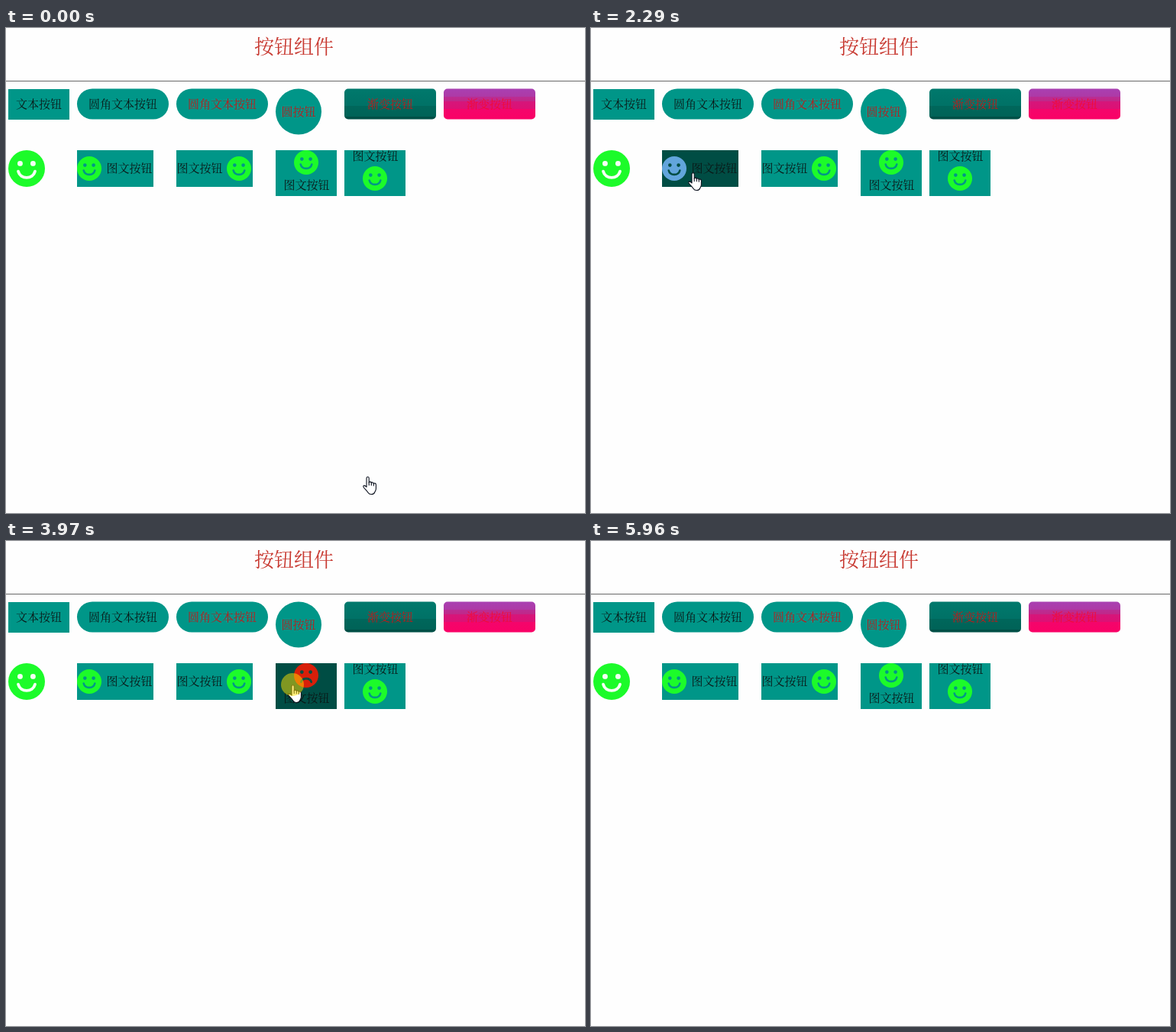
Animation of 758x635 px, one loop 6.27 s. Source, as an HTML page:

```html
<!DOCTYPE html>
<html lang="zh-CN">
<head>
<meta charset="utf-8">
<title>按钮组件</title>
<style>
  html, body { margin: 0; width: 100%; height: 100%; overflow: hidden; background: #fefefe; }
  svg { display: block; width: 758px; height: 635px; }
  text { font: 15px "Noto Serif CJK SC", "Noto Sans CJK SC", "Noto Sans CJK", serif; fill: #0b1716; }
  .title { font-size: 26px; fill: #c83a32; }
  .red { fill: #c21a1a; }
  .hot { fill: #f30a35; }
  .teal { fill: #009688; }
  .widget { --bg: #009688; --face: #1cfb2a; --hole: var(--bg); }
  .widget.hover { --bg: #004d44; --face: #62a5dc; }
  .widget.pressed { --face: #d81f0a; }
  .widget.bare { --hole: #f6fff6; }
  .panel { fill: var(--bg); }
  .face { fill: var(--face); }
  .eye { fill: var(--hole); }
  .mouth { fill: none; stroke: var(--hole); stroke-width: 2.6; stroke-linecap: round; }
  .sad, .pressed .smile { display: none; }
  .pressed .sad { display: inline; }
  #hand path { fill: #fff; stroke: #0a0f1c; stroke-width: 1.1; stroke-linejoin: round; stroke-linecap: round; }
</style>
</head>
<body>
<svg viewBox="0 0 758 635">
  <defs>
    <linearGradient id="forest" x2="0" y2="1">
      <stop offset="0" stop-color="#00796c"/><stop offset=".55" stop-color="#007166"/>
      <stop offset=".55" stop-color="#00675b"/><stop offset=".92" stop-color="#006257"/>
      <stop offset=".92" stop-color="#004f46"/>
    </linearGradient>
    <linearGradient id="berry" x2="0" y2="1">
      <stop offset="0" stop-color="#a940b2"/><stop offset=".27" stop-color="#ae39a5"/>
      <stop offset=".27" stop-color="#ba2d93"/><stop offset=".4" stop-color="#c02889"/>
      <stop offset=".4" stop-color="#d5167b"/><stop offset=".67" stop-color="#dd1074"/>
      <stop offset=".67" stop-color="#f4056b"/><stop offset="1" stop-color="#fa0166"/>
    </linearGradient>
  </defs>
  <text class="title" x="325" y="33.5">按钮组件</text>
  <path d="M0 69.5H758" stroke="#686868"/>

  <rect class="teal" x="3" y="80" width="80" height="40"/>
  <text x="13" y="105">文本按钮</text>
  <rect class="teal" x="93" y="79.5" width="120" height="40" rx="20"/>
  <text x="108" y="105">圆角文本按钮</text>
  <rect class="teal" x="223" y="79.5" width="120" height="40" rx="20"/>
  <text class="red" x="238" y="105">圆角文本按钮</text>
  <circle class="teal" cx="383" cy="109.5" r="30"/>
  <text class="red" x="360.5" y="115">圆按钮</text>
  <rect fill="url(#forest)" x="443" y="79.5" width="120" height="40" rx="5"/>
  <text class="red" x="473" y="105">渐变按钮</text>
  <rect fill="url(#berry)" x="573" y="79.5" width="120" height="40" rx="5"/>
  <text class="hot" x="603" y="105">渐变按钮</text>

  <g id="widgets"></g>
  <g id="hand">
    <path d="M5 14V2.4C5 .1 8.2 .1 8.2 2.4V8.2C8.6 6.6 11.2 6.8 11.3 8.6C11.8 7.4 14.2 7.8 14.3 9.6C14.9 8.5 17.3 9 17.4 11V16C17.4 18.6 16.1 19.6 15.6 21C14.6 24.2 8.6 24.2 7.2 21.6C5.6 18.6 2.6 16.6 1 14C.1 12.2 2.6 10.9 5 14Z"/>
    <path d="M8.2 8V11.6M11.3 8.6V11.8M14.3 9.6V12.2"/>
  </g>
  <circle id="ring" r="15" fill="#ffe100" fill-opacity=".5"/>
</svg>
<script>
const LOOP = 6270, FIRST_HOVER = 710, GONE = 5960;

const widgets = [
  { x: 3, y: 160, w: 48, h: 48, icon: [3, 160, 1.5] },
  { x: 93, y: 160, w: 100, h: 48, icon: [93, 168, 1], label: [131.5, 189] },
  { x: 223, y: 160, w: 100, h: 48, icon: [289, 168, 1], label: [223.5, 189] },
  { x: 353, y: 160, w: 80, h: 60, icon: [377, 160, 1], label: [363.5, 211] },
  { x: 443, y: 160, w: 80, h: 60, icon: [467, 181, 1], label: [453.5, 173] }
];

// Pointer moves; dip bows the path downwards.
const moves = [
  { start: 70, end: 560, steps: 7, to: [25, 182], dip: 0 },
  { start: 1570, end: 1830, steps: 4, to: [127, 189], dip: 13 },
  { start: 2610, end: 2860, steps: 4, to: [237, 194], dip: 0 },
  { start: 3570, end: 3890, steps: 5, to: [369, 188], dip: 16 },
  { start: 4300, end: 4620, steps: 5, to: [455, 207], dip: 0 },
  { start: 5490, end: GONE, steps: 7, to: [660, 640], dip: 0 }
];

// Each click: ring appears, icon turns red, release.
const clicks = [
  [870, 870, 1040], [1210, 1270, 1420],
  [1980, 2060, 2290], [2440, 2440, 2610],
  [3010, 3070, 3200], [3270, 3270, 3420],
  [3970, 3970, 4300],
  [4720, 4800, 4860], [4940, 4940, 5490]
];

const byId = id => document.getElementById(id);
const hand = byId('hand'), ring = byId('ring');

function widgetMarkup({ x, y, w, h, icon: [ix, iy, scale], label }) {
  const panel = label ? `<rect class="panel" x="${x}" y="${y}" width="${w}" height="${h}"/>` : '';
  const text = label ? `<text x="${label[0]}" y="${label[1]}">图文按钮</text>` : '';
  return `<g class="widget">${panel}${text}
    <g transform="translate(${ix} ${iy}) scale(${scale})">
      <circle class="face" cx="16" cy="16" r="16"/>
      <circle class="eye" cx="10.3" cy="11.6" r="2.3"/>
      <circle class="eye" cx="21.6" cy="11.6" r="2.3"/>
      <path class="mouth smile" d="M8.7 18.5C10.5 25.7 21.5 25.7 23.3 18.5"/>
      <path class="mouth sad" d="M9.3 24.7C11 18.6 21 18.6 22.7 24.7"/>
    </g></g>`;
}

byId('widgets').innerHTML = widgets.map(widgetMarkup).join('');
const nodes = [...byId('widgets').children];

function pointerAt(t) {
  let [x, y] = [467, 587];
  for (const { start, end, steps, to, dip } of moves) {
    if (t < start) break;
    const interval = (end - start) / (steps - 1);
    const p = Math.min(1, (Math.floor((t - start) / interval + 1e-6) + 1) / steps);
    const e = p * p * (3 - 2 * p);
    x += (to[0] - x) * e;
    y += (to[1] - y) * e + 4 * dip * e * (1 - e);
  }
  return [Math.round(x), Math.round(y)];
}

function render(t) {
  const [x, y] = pointerAt(t);
  const tip = x + 6;
  const click = clicks.find(([down, , up]) => t >= down && t < up);
  const show = (el, on) => el.setAttribute('visibility', on ? 'visible' : 'hidden');

  hand.setAttribute('transform', `translate(${x} ${y})`);
  ring.setAttribute('cx', tip);
  ring.setAttribute('cy', y);
  show(hand, t < GONE);
  show(ring, click);

  widgets.forEach((b, i) => {
    const hover = t >= FIRST_HOVER && tip >= b.x && tip < b.x + b.w && y >= b.y && y < b.y + b.h;
    const pressed = hover && click && t >= click[1];
    nodes[i].setAttribute('class',
      'widget' + (b.label ? '' : ' bare') + (hover ? ' hover' : '') + (pressed ? ' pressed' : ''));
  });
}

const origin = performance.now();
function tick() {
  render((performance.now() - origin) % LOOP);
  requestAnimationFrame(tick);
}
tick();
</script>
</body>
</html>
```
